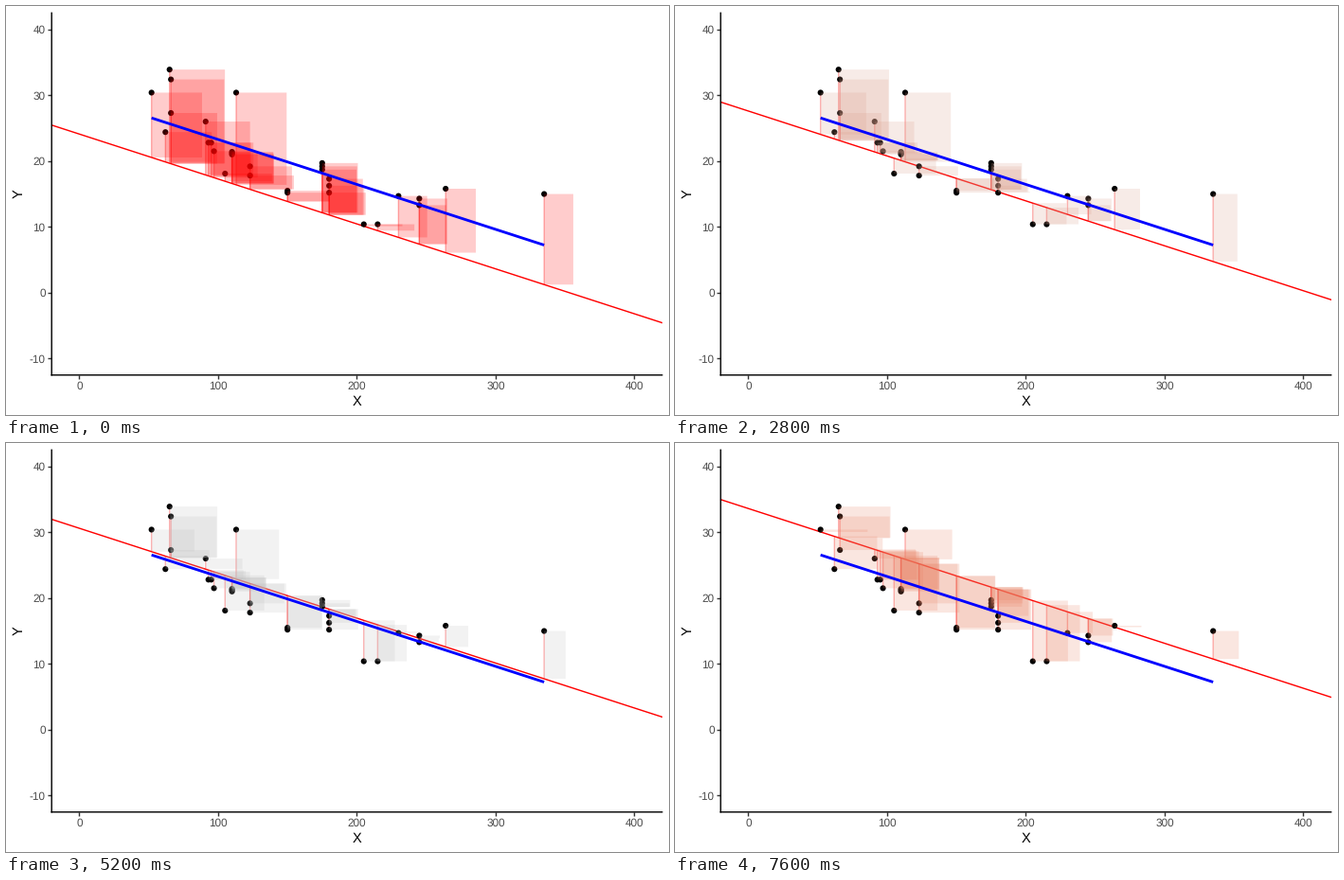
A matplotlib script that plays this animation: 700 by 432 pixels, repeating every 8 s.

```python
import numpy as np
import matplotlib.pyplot as plt
from matplotlib.animation import FuncAnimation
from matplotlib.collections import LineCollection, PolyCollection

plt.rcParams.update({"path.snap": False, "text.hinting": "none",
                     "font.family": "Liberation Sans"})

W, H, DPI = 700, 432, 72            # at 72 dpi one point is one pixel
LEFT, RIGHT, TOP, BOTTOM = 48.2, 692.67, 7.33, 389.8
X_LIM, Y_LIM = (-20, 420), (-12.5, 42.5)
FRAMES, INTERVAL = 20, 400
THIN, THICK = 1.42, 2.85
SLOPE, INTERCEPT = -0.06823, 30.1
GREY, RED = np.full(3, 190 / 255), np.array([1, 0, 0])


def column(x, low, high, n=2):
    """Evenly stacked points at one x."""
    return [(x, y) for y in np.linspace(low, high, n)]


points = np.array([
    (52, 30.4), (62, 24.4), (65, 33.9), *column(66, 27.3, 32.4), (91, 26),
    (93, 22.8), (95, 22.8), (97, 21.5), (105, 18.1), (113, 30.4),
    *column(110, 21, 21.4, 3), *column(123, 17.8, 19.2),
    *column(150, 15.2, 15.5), *column(175, 18.7, 19.7, 3),
    *column(180, 15.2, 17.3, 3), (205, 10.4), (215, 10.4), (230, 14.7),
    *column(245, 13.3, 14.3), (264, 15.8), (335, 15)])
x, y = points.T


def best_fit(v):
    return INTERCEPT + SLOPE * v


fitted = best_fit(x)
reach = fitted + np.abs(y - fitted)


def fill_color(offset):
    """Grey near the best fit, red far away, on a perceptual-like curve."""
    t = np.clip((abs(offset) - 1) / 5, 0, 1)
    return (*(RED + (GREY - RED) * (1 - t) ** np.array([1.55, 0.55, 0.92])),
            0.2)


fig = plt.figure(figsize=(W / DPI, H / DPI), dpi=DPI, facecolor="white")
ax = fig.add_axes([LEFT / W, 1 - BOTTOM / H,
                   (RIGHT - LEFT) / W, (BOTTOM - TOP) / H])
ax.set(xlim=X_LIM, ylim=Y_LIM, xticks=range(0, 401, 100),
       yticks=range(-10, 41, 10))
ax.spines[["top", "right"]].set_visible(False)
ax.spines[["left", "bottom"]].set_linewidth(THIN)
ax.tick_params(length=3.67, width=THIN, color="#333333",
               labelbottom=False, labelleft=False)


def label(px, py, text, size=11.73, color="#4D4D4D", ha="center", **kw):
    fig.text(px / W, 1 - py / H, text, fontsize=size, color=color,
             ha=ha, va="baseline", rotation_mode="anchor", **kw)


for v in ax.get_xticks():
    px = np.interp(v, X_LIM, (LEFT, RIGHT))
    label(px, BOTTOM + 15, f"{v:.0f}")
for v in ax.get_yticks():
    py = np.interp(v, Y_LIM, (BOTTOM, TOP))
    label(LEFT - 6.6, py + 4.2, f"{v:.0f}", ha="right")
label((LEFT + RIGHT) / 2, 421.6, "X", 14.67, "black")
label(17.9, (TOP + BOTTOM) / 2, "Y", 14.67, "black", rotation=90)

guess, = ax.plot([], [], color="red", lw=THIN, zorder=2)
stems = LineCollection([], colors=[(1, 0, 0, 0.3)], linewidths=THIN, zorder=3)
ax.add_collection(stems, autolim=False)
# one size per dot keeps their sub-pixel positions
ax.scatter(x, y, s=np.full(x.size, 6.15 ** 2), c="black", linewidths=0,
           zorder=4)
boxes = PolyCollection([], linewidths=0, zorder=5)
ax.add_collection(boxes, autolim=False)
ends = np.array([x.min(), x.max()])
ax.plot(ends, best_fit(ends), color="blue", lw=THICK,
        solid_capstyle="butt", zorder=6)


def update(i):
    offset = -6 + 0.5 * i
    line_y = fitted + offset
    right = x + reach + abs(offset)
    guess.set_data(X_LIM, best_fit(np.array(X_LIM)) + offset)
    stems.set_segments([[(a, b), (a, c)] for a, b, c in zip(x, y, line_y)])
    boxes.set_verts([[(a, b), (r, b), (r, c), (a, c)]
                     for a, b, c, r in zip(x, y, line_y, right)])
    boxes.set_facecolor(fill_color(offset))
    return guess, stems, boxes


anim = FuncAnimation(fig, update, frames=FRAMES, interval=INTERVAL,
                     repeat=True, repeat_delay=0)
plt.show()
```
